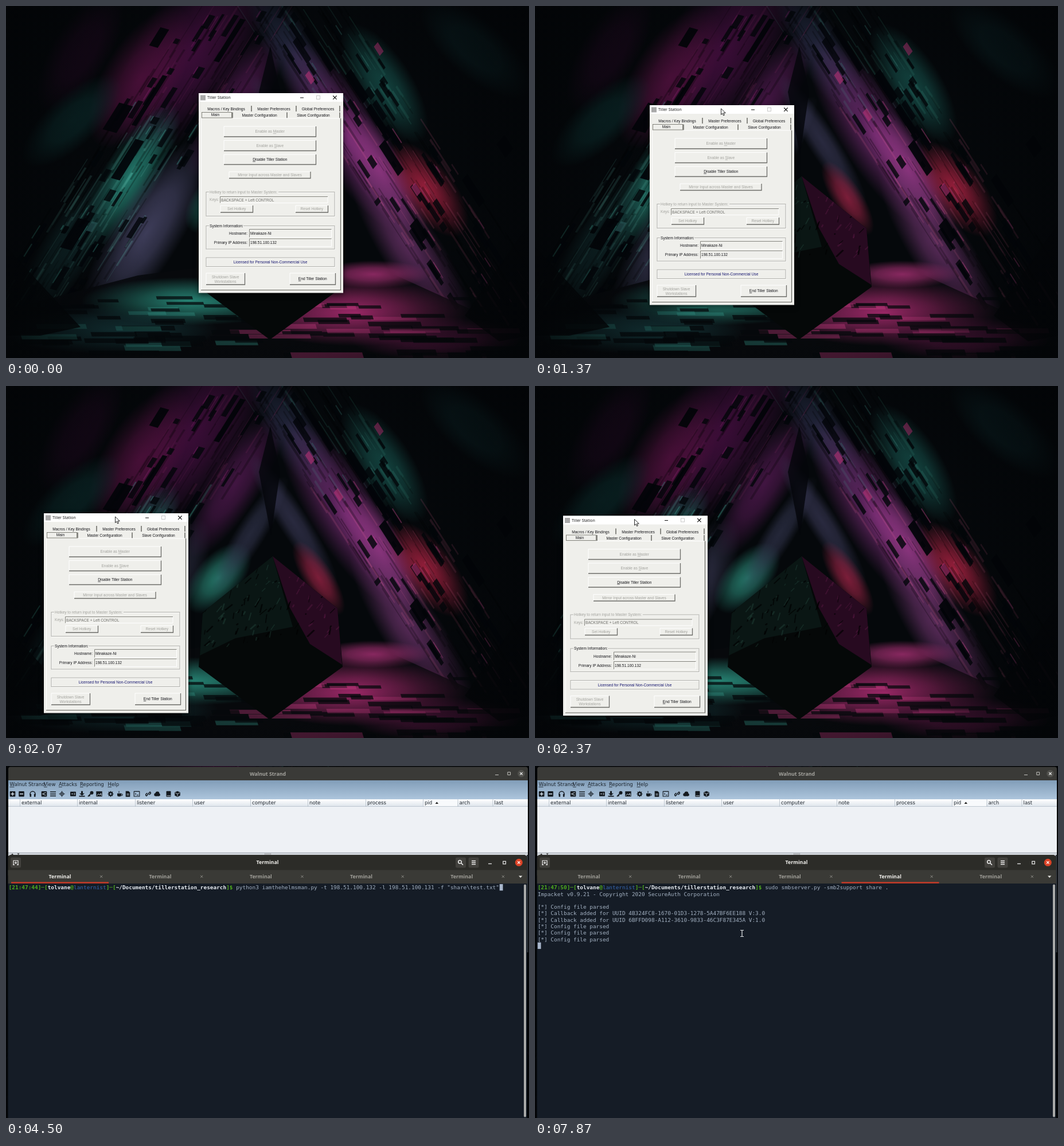
Recreate the animation shown at these times as an HTML page with a canvas. Size 912 by 614 pixels, loop 8000 ms.

```html
<!DOCTYPE html>
<html lang="en">
<head>
<meta charset="utf-8">
<title>Desktop and terminal</title>
<style>
html, body { margin: 0; width: 100%; height: 100%; overflow: hidden; background: #05070a; }
canvas, svg { position: absolute; left: 0; top: 0; width: 912px; height: 614px; display: block; }
text { white-space: pre; }
.ui { font: 6.6px "Liberation Sans", Arial, sans-serif; }
.cap { font: 7px "Open Sans", sans-serif; }
.menu { font: 8.6px "DejaVu Sans", sans-serif; fill: #1c242c; }
.head { font: 700 8.8px "Noto Sans", sans-serif; }
.mono { font: 9.41px "DejaVu Sans Mono", monospace; fill: #a3b1c2; }
.mono .g { fill: #4fae1d; font-weight: 700; }
.mono .w { fill: #e8edf2; font-weight: 700; }
.mono .b { fill: #3768b0; }
#win { filter: drop-shadow(0 3px 5px rgba(0,0,0,.6)); }
</style>
</head>
<body>
<canvas id="wall" width="912" height="614"></canvas>
<svg id="stage" viewBox="0 0 912 614" xmlns="http://www.w3.org/2000/svg">
  <defs>
    <linearGradient id="bar" x2="0" y2="1"><stop stop-color="#819db8"/><stop offset="1" stop-color="#adc5dc"/></linearGradient>
    <linearGradient id="cols" x2="0" y2="1"><stop stop-color="#fff"/><stop offset="1" stop-color="#dde4eb"/></linearGradient>
  </defs>
  <g id="desk"><g id="win"></g></g>
  <g id="term"></g>
  <g id="arrow"><path d="M0 0V10.5L2.4 8.3L4.1 12L5.9 11.2L4.2 7.6H7.8Z" stroke-width=".9"/></g>
  <path id="beam" d="M-3-5.5H-.8L0-5L.8-5.5H3M0-5V5M-3 5.5H-.8L0 5L.8 5.5H3" fill="none" stroke="#e6e9ec" stroke-width="1.2"/>
</svg>
<script>
const $ = id => document.getElementById(id);
const LOOP = 8000, CUT = 4500, SWITCH = 6670;
const APP = 'Tiller Station', CONSOLE = 'Walnut Strand';

// ---- wallpaper -------------------------------------------------
function paintWall() {
  const c = $('wall').getContext('2d');
  let seed = 41;
  const rnd = (a = 0, b = 1) => a + (b - a) * (seed = seed * 16807 % 2147483647) / 2147483647;
  const L = 2.13, R = 1.0;
  const poly = (fill, ...p) => {
    c.beginPath();
    for (let i = 0; i < p.length; i += 2) c.lineTo(p[i], p[i + 1]);
    c.closePath(); c.fillStyle = fill; c.fill();
  };
  const glow = (x, y, rx, ry, rot, col, a) => {
    c.save(); c.translate(x, y); c.rotate(rot); c.scale(rx, ry);
    const g = c.createRadialGradient(0, 0, 0, 0, 0, 1);
    g.addColorStop(0, col + a); g.addColorStop(.45, col + '88'); g.addColorStop(1, col + '00');
    c.fillStyle = g; c.fillRect(-1, -1, 2, 2); c.restore();
  };
  const slab = (x, y, len, wid, rot, col) => {
    c.save(); c.translate(x, y); c.rotate(rot);
    poly(col, -len / 2, -wid / 2, len / 2 - wid * .3, -wid / 2, len / 2, wid / 2, -len / 2 + wid * .3, wid / 2);
    c.restore();
  };
  const spot = side => {
    const s = rnd();
    return side < 0 ? [425 - s * 370 + rnd(-95, 95), s * 520] : [495 + s * 370 + rnd(-95, 95), s * 520];
  };

  c.fillStyle = '#05080b'; c.fillRect(0, 0, 912, 614);
  // left wall
  glow(330, 70, 220, 95, L, '#4d0f47', 'dd');
  glow(235, 125, 140, 65, L, '#68144d', 'bb');
  glow(130, 80, 120, 50, L, '#2c0a2a', '99');
  glow(400, 170, 150, 45, L, '#571a55', 'bb');
  glow(115, 200, 110, 45, 2.4, '#0f3d3c', '99');
  glow(215, 300, 150, 48, L, '#2a9483', 'cc');
  glow(245, 395, 190, 60, L, '#514f74', 'bb');
  glow(110, 420, 150, 48, L, '#173c3d', '99');
  // hollow between the walls
  glow(370, 335, 75, 40, 2.3, '#2c8f7d', 'cc');
  glow(425, 260, 120, 26, L, '#33364f', 'aa');
  glow(500, 235, 140, 26, R, '#3b3a58', 'aa');
  glow(545, 335, 75, 26, R, '#a52549', 'bb');
  // right wall
  glow(505, 85, 150, 45, R, '#2a304b', 'cc');
  glow(595, 225, 200, 62, R, '#752b74', 'dd');
  glow(650, 285, 140, 45, R, '#9a3a8a', 'cc');
  glow(660, 135, 120, 48, R, '#1a6059', 'bb');
  glow(735, 320, 100, 46, .9, '#c3264a', 'dd');
  glow(710, 430, 190, 52, R, '#733672', 'cc');
  glow(820, 75, 120, 50, .7, '#0f3033', '88');
  poly('#04050acc', 461, 70, 478, 150, 462, 260, 441, 150);

  // slanted fibres, then blocks
  c.filter = 'blur(.5px)';
  for (let i = 0; i < 420; i++) {
    const side = i % 2 ? 1 : -1, [x, y] = spot(side);
    const tint = i % 3 ? '#00000040' : side < 0 ? (y < 200 ? '#9a3a7022' : '#6cc8b82c') : (y < 190 ? '#50b0a022' : '#ff70a024');
    slab(x, y, rnd(20, 100), rnd(1, 4), side < 0 ? L : R, tint);
  }
  for (let i = 0; i < 120; i++) {
    const side = i % 2 ? 1 : -1, [x, y] = spot(side), len = rnd(12, 52), wid = rnd(4, 11), rot = side < 0 ? L : R;
    slab(x, y, len, wid, rot, '#03060ad0');
    if (i % 4 < 2) slab(x + side * 5, y - 4, len * .6, 2, rot, side < 0 ? (y > 170 ? '#3c9c8c66' : '#7c206666') : (y > 170 ? '#c2468c66' : '#33706c66'));
  }
  [[195, 195, 62, 24], [250, 165, 105, 8], [212, 268, 85, 15], [120, 398, 66, 20], [267, 55, 42, 15], [390, 60, 90, 9]]
    .forEach(b => slab(...b, L, '#030509ee'));
  [[612, 140, 62, 15], [650, 203, 70, 12], [672, 265, 66, 15], [720, 392, 42, 18], [815, 322, 60, 14], [870, 245, 34, 20], [545, 75, 90, 9]]
    .forEach(b => slab(...b, R, '#030509ee'));
  [[150, 385], [400, 505], [650, 75], [530, 125], [580, 190], [715, 320]]
    .forEach(([x, y]) => slab(x, y, 22, 10, x < 450 ? L : R, x < 450 ? '#33706f99' : '#b5327499'));
  c.filter = 'none';

  // floor
  poly('#070a0ddd', 0, 530, 230, 470, 460, 440, 680, 470, 912, 575, 912, 614, 0, 614);
  glow(320, 515, 190, 42, 0, '#2b9482', 'dd');
  glow(180, 565, 190, 42, 0, '#1b4a4d', 'bb');
  glow(610, 535, 200, 58, 0, '#b42d76', 'dd');
  glow(750, 580, 150, 38, 0, '#701b51', 'aa');
  glow(640, 468, 100, 24, 0, '#b5337d', 'bb');
  for (let i = 0; i < 85; i++) {
    const y = rnd(505, 612), x = rnd(60, 860), k = (y - 480) / 130;
    slab(x, y, rnd(35, 85) * (.6 + k), rnd(3, 5) + 6 * k, 0, i % 4 ? '#05080bc0' : x < 440 ? '#37a39455' : '#d8408a55');
  }
  poly('#040609d8', 0, 420, 130, 560, 60, 575, 0, 575);
  poly('#040609c0', 912, 380, 800, 540, 860, 585, 912, 575);

  // cube
  poly('#050808', 465, 297, 578, 388, 587, 490, 460, 582, 336, 490, 343, 395);
  poly('#0a1614', 465, 297, 343, 395, 338, 470, 400, 440, 500, 420);
  poly('#270a20', 465, 297, 578, 388, 586, 486, 530, 450, 494, 385);
  c.save();
  c.beginPath(); c.moveTo(465, 297); c.lineTo(578, 388); c.lineTo(586, 480); c.lineTo(500, 430); c.lineTo(340, 465); c.lineTo(343, 395); c.clip();
  for (let i = 0; i < 170; i++) {
    const x = rnd(340, 585);
    slab(x, rnd(300, 470), rnd(3, 18), rnd(1, 3), rnd(1.7, 2.5), i % 2 ? '#000a' : x < 480 ? '#2a564855' : '#6a205055');
  }
  c.restore();

  const v = c.createRadialGradient(456, 330, 240, 456, 330, 560);
  v.addColorStop(0, '#02040600'); v.addColorStop(1, '#020406e0');
  c.fillStyle = v; c.fillRect(0, 0, 912, 614);
}

// ---- svg helpers -----------------------------------------------
const rect = (x, y, w, h, fill, more = '') => `<rect x="${x}" y="${y}" width="${w}" height="${h}" fill="${fill}" ${more}/>`;
const line = (d, col, w = 1, more = '') => `<path d="${d}" fill="none" stroke="${col}" stroke-width="${w}" ${more}/>`;
const text = (x, y, s, cls, fill = '', anchor = 'start', more = '') =>
  `<text x="${x}" y="${y}" class="${cls}" text-anchor="${anchor}" ${fill && `fill="${fill}"`} ${more}>` +
  s.replace(/_(.)/, '<tspan text-decoration="underline">$1</tspan>') + '</text>';

// ---- settings window -------------------------------------------
function buildWindow() {
  const INK = '#16161a', DIM = '#a3a39e', EDGE = '#6c6c68';
  const label = (x, y, s, col = INK, anchor = 'middle') => text(x, y + 2.4, s, 'ui', col, anchor);
  const button = (x, y, w, h, s, col = DIM) =>
    line(`M${x} ${y + h}V${y}H${x + w}`, '#fff') + line(`M${x} ${y + h}H${x + w}V${y}`, EDGE, 1.3) +
    (s ? label(x + w / 2, y + h / 2, s, col) : '');
  const frame = (x, y, w, h) =>
    rect(x + 1, y + 1, w, h, 'none', 'stroke="#fff" stroke-width=".8"') + rect(x, y, w, h, 'none', 'stroke="#a9a9a4" stroke-width=".9"');
  const group = (y, h, s, w, col) => frame(13, y, 224, h) + rect(18, y - 4, w, 8, '#efefeb') + label(19, y, s, col, 'start');
  const field = (x, y, w, h, s, col) =>
    line(`M${x} ${y + h}H${x + w}V${y}`, '#fff') + line(`M${x} ${y + h}V${y}H${x + w}`, '#85857f') + label(x + 1.5, y + h / 2 + .2, s, col, 'start');
  const sep = (x, y) => line(`M${x} ${y}v10`, '#44443f', 1.2);

  $('win').innerHTML = rect(0, 0, 252, 348.5, '#efefeb') + rect(0, 0, 252, 15, '#fff') +
    rect(3, 3.5, 9, 9, '#a9a9a9') + text(15, 10, APP, 'cap', '#111') +
    line('M177 8H183', '#111') + rect(205.5, 4.5, 6, 6, 'none', 'stroke="#c4c4c4" stroke-width=".9"') +
    line('M234.2 4.5l6.4 6.4m0-6.4l-6.4 6.4', '#111', 1.1) +
    label(48, 27.8, 'Macros / Key Bindings') + label(131, 27.8, 'Master Preferences') + label(208, 27.8, 'Global Preferences') +
    sep(92, 22) + sep(170, 22) + sep(246, 22) +
    rect(5.5, 33.5, 52, 9.5, 'none', 'stroke="#77776f" stroke-width=".9"') + sep(59, 33.5) + sep(154, 33.5) + sep(246, 33.5) +
    label(29, 38, 'Main') + label(106, 39, 'Master Configuration') + label(200, 39, 'Slave Configuration') +
    line('M4.5 343V44M59 44H246', '#fff') + line('M4 343.5H247.5V44', '#66665f', 1.2) +
    button(44, 58, 160.5, 18, 'Enable as _Master') + button(44, 82.5, 160.5, 18, 'Enable as _Slave') +
    button(44, 107, 160.5, 17.5, '_Disable ' + APP, INK) + button(53, 137, 142, 11.5, 'Mirror Input across Master and Slaves') +
    group(172.5, 42, 'Hotkey to return input to Master System:', 121, DIM) +
    label(19, 186, 'Keys:', DIM, 'start') + field(37.5, 180.5, 187.5, 11, 'BACKSPACE + Left CONTROL', '#70706c') +
    button(38, 196, 56.5, 12, 'Set Hotkey') + button(169, 196, 56.5, 12, 'Reset Hotkey') +
    group(231.5, 40.5, 'System Information:', 60, INK) +
    label(85, 244.7, 'Hostname:', INK, 'end') + field(88.5, 237.5, 143, 14, 'Minakaze-Ni', INK) +
    label(85, 261, 'Primary IP Address:', INK, 'end') + field(88.5, 254, 143, 13.5, '198.51.100.132', INK) +
    frame(13, 287, 224, 15.5) + label(125, 295, 'Licensed for Personal Non-Commercial Use', '#14146e') +
    button(13, 314, 67.5, 20) + label(46.5, 320.5, 'Shutdown Slave', DIM) + label(46.5, 328.5, 'Workstations', DIM) +
    button(159, 314, 79.5, 20, '_End ' + APP, INK);
}

// ---- console and terminal --------------------------------------
function toolbar() {
  const K = '#141a20';
  const at = (x, s) => `<g transform="translate(${x} 48.7)" stroke-linejoin="round">${s}</g>`;
  const box = rect(-4.8, -4.8, 9.6, 9.6, K, 'rx="1.3"');
  const stroke = (d, w = 1.4) => line(d, K, w), cut = (d, w = 1.3) => line(d, '#cfdbe6', w);
  const dot = (x, y, r) => `<circle cx="${x}" cy="${y}" r="${r}" fill="${K}"/>`;
  const fill = d => `<path d="${d}" fill="${K}"/>`;
  return [
    [11.5, box + cut('M-3 0H3M0-3V3', 1.6)], [27, box + cut('M-3 0H3', 1.6)],
    [46.5, stroke('M-4.5 2V0A4.5 4.5 0 0 1 4.5 0V2') + rect(-5, 0, 2.6, 5, K) + rect(2.4, 0, 2.6, 5, K)],
    [66.5, box + cut('M-3 0L3-2.5M-3 0L3 2.5', 1)], [82, stroke('M-5-3.5H5M-5 0H5M-5 3.5H5', 1.6)],
    [97.5, stroke('M0-5V5M-5 0H5M3 0A3 3 0 1 1-3 0A3 3 0 1 1 3 0', 1)],
    [117, rect(-5, -4, 10, 8, K, 'rx="1"') + cut('M-3 0H0M1.5-1H3.5M1.5 1H3.5', 1)],
    [132.5, fill('M-1.5-5H1.5V-1H4.5L0 3L-4.5-1H-1.5Z') + stroke('M-5 4H5', 1.8)],
    [147.5, dot(2, -2, 3) + stroke('M0 0L-4.5 4.5M-2.5 2.5L-1 4', 1.9)],
    [162.5, rect(-5.2, -4.5, 10.4, 9, K) + cut('M-4 3L-1 0L1 2L3-1L4 3', 1)],
    [182.5, dot(0, 0, 3.7) + line('M0-5V5M-5 0H5M-3.6-3.6L3.6 3.6M-3.6 3.6L3.6-3.6', K, 1.6) + '<circle r="1.5" fill="#9fb7cd"/>'],
    [198, fill('M-4-1H3V2Q3 4.5 0 4.5H-1Q-4 4.5-4 2Z') + stroke('M3 0Q5.5 0 5 2Q4.5 3 3 3M-1-5V-2', 1.1)],
    [212.5, fill('M-3.8-5H1.2L3.8-2.4V5H-3.8Z') + cut('M-2 0H2M-2 2H2', .8)],
    [228, rect(-4.8, -4.3, 9.6, 8.6, 'none', `stroke="${K}" stroke-width="1.1"`) + stroke('M-3-1.5L-1 0L-3 1.5M0 2H3', 1)],
    [248, stroke('M-1 1.5L-3 3.5A2 2 0 0 1-4 .5L-1.5-1.5M1-1.5L3-3.5A2 2 0 0 1 4-.5L1.5 1.5M-1.5 1.5L1.5-1.5', 1.5)],
    [263.5, dot(-2.5, 1.2, 2.7) + dot(.5, -.8, 3.4) + dot(3, 1.5, 2.4) + rect(-2.5, 1, 5.5, 2.9, K)],
    [283.5, rect(-4, -5, 8, 10, K, 'rx="1"') + cut('M-3 3.2H3.5', .9)],
    [299, fill('M0-5L4.8-2.6V2.8L0 5.2L-4.8 2.8V-2.6Z') + cut('M-4-2L0 0L4-2M0 0V4.5', .8)]
  ].map(([x, s]) => at(x, s)).join('');
}

const TABS = [94, 269, 444.3, 619.5, 794.7];

function buildTerm() {
  const menus = [[6.5, CONSOLE], [66, 'View'], [92, 'Attacks'], [129, 'Reporting'], [177.5, 'Help']];
  const cols = [[24, 'external'], [124, 'internal'], [225, 'listener'], [325, 'user'], [426, 'computer'], [526, 'note'],
    [627, 'process'], [727, 'pid'], [787.5, 'arch'], [848.5, 'last']];
  const pad = (x, s) => rect(x, 159.5, 18, 18, '#42413d', 'rx="2.5"') + s;
  const upper = rect(4, 1.5, 906, 30, '#3a3a37', 'rx="4"') + text(456.5, 17, CONSOLE, 'head', '#a5a49f', 'middle') +
    line('M853 15.5H859M874.8 10.8H879.6V15.6H874.8Z', '#c4c4c0') +
    '<circle cx="898.5" cy="13.3" r="6.3" fill="#50504c"/>' + line('M896.3 11.1l4.4 4.4m0-4.4l-4.4 4.4', '#eee', 1.2) +
    rect(4, 25, 906, 33, 'url(#bar)') + menus.map(([x, s]) => text(x, 35.3, '_' + s, 'menu')).join('') + toolbar() +
    rect(4, 58, 906, 13, 'url(#cols)') + rect(727, 58, 60, 12.5, '#f8fafc') +
    cols.map(([x, s]) => line(`M${x + .5} 58V71`, '#b3bdc7', .8) + text(x + 3, 67.2, s, 'menu')).join('') +
    '<path d="M748.5 66L751.3 62.5L754 66Z" fill="#222"/>' + line('M4 70.7H910', '#aab6c1', .8) +
    rect(4, 71, 906, 80, '#eef1f5') + rect(4, 151, 906, 6, '#d2d7dd') + line('M4 151.3H910', '#8d969e', .7) +
    '<path d="M9 155L11 152.5L13 155ZM19.5 152.5H23.5L21.5 155Z" fill="#333"/>' + line('M451 153.5H462', '#888', 2, 'stroke-dasharray="1 1"');

  const header = rect(908, 155, 2.5, 170, '#30353b') + rect(3.5, 155, 905, 40, '#2c2c28', 'rx="5"') +
    text(456, 171.4, 'Terminal', 'head', '#f1f0ec', 'middle') +
    pad(8, line('M13 172V165H21V172M12 172.3H15M19 172.3H22M17 166.5V171M14.8 168.8H19.2', '#eee', 1.2)) +
    pad(784, line('M794.3 167.2A2.8 2.8 0 1 1 788.7 167.2A2.8 2.8 0 1 1 794.3 167.2M793.6 169.3L797 172.6', '#eee', 1.5)) +
    pad(806.5, line('M812 165.5H819M812 168.5H819M812 171.5H819', '#eee', 1.4)) +
    line('M841 170.5H847', '#ddd', 1.4) + rect(866.8, 166.3, 4.6, 4.6, 'none', 'stroke="#ddd" stroke-width="1.3"') +
    '<circle cx="894.3" cy="168.3" r="6.5" fill="#dc4327"/>' + line('M892.1 166.1l4.4 4.4m0-4.4l-4.4 4.4', '#fff', 1.2) +
    rect(3.5, 181.5, 905, 24, '#3a3a36') +
    TABS.map((x, i) => rect(x - 85, 182, 170, 22.5, '#454540', `id="hov${i}"`) +
      text(x, 196.2, 'Terminal', 'head', '', 'middle', `id="tab${i}"`) +
      line(`M${x + 70.2} 190.8l4 4m0-4l-4 4`, '#8e8d87')).join('') +
    rect(0, 202.3, 170, 2.4, '#cb3a27', 'id="mark"') + '<path d="M894 191.5H900.4L897.2 195Z" fill="#e4e4e0"/>';

  const row = (n, s) => `<text class="mono" x="4.7" y="${215.2 + n * 11.3}">${s}</text>`;
  const span = (k, s) => `<tspan class="${k}">${s}</tspan>`;
  const prompt = (clock, cmd) => row(0, span('g', `[${clock}]─[`) + span('w', 'tolvane') + span('g', '@') + span('b', 'lanternist') +
    span('g', ']─[') + span('w', '~/Documents/tillerstation_research') + span('g', ']$') + ' ' + cmd);
  const parsed = '[*] Config file parsed', added = '[*] Callback added for UUID ';
  const log = ['Impacket v0.9.21 - Copyright 2020 SecureAuth Corporation', '', parsed,
    added + '4B324FC8-1670-01D3-1278-5A47BF6EE188 V:3.0', added + '6BFFD098-A112-3610-9833-46C3F87E345A V:1.0', parsed, parsed, parsed];

  $('term').innerHTML = upper + header + rect(3.5, 205, 905, 409, '#151c26') +
    rect(903, 206.5, 4, 406, '#a9aaa9', 'rx="2"') +
    `<g id="pane0">${prompt('21:47:44', 'python3 iamthehelmsman.py -t 198.51.100.132 -l 198.51.100.131 -f "share\\test.txt"')}</g>` +
    `<g id="pane3">${prompt('21:47:50', 'sudo smbserver.py -smb2support share .')}${log.map((s, i) => row(i + 1, s)).join('')}</g>` +
    rect(0, 0, 5.8, 11.3, '#a9b7cc', 'id="block"');
}

// ---- motion: [ms, x, y, ...] -----------------------------------
const DRAG = [[0, 336, 152], [1170, 326, 153], [1200, 307, 156], [1230, 282, 160], [1270, 254, 164], [1300, 226, 168], [1330, 200, 173],
  [1400, 182, 177], [1870, 159, 185], [1930, 139, 191], [1970, 112, 201], [2030, 84, 214], [2070, 66, 222], [2100, 61, 224],
  [2130, 59, 225], [2300, 54, 225.5], [2370, 49, 226.5]];
const REACH = [[630, 523, 181], [670, 508, 176], [730, 486, 167], [770, 468, 160], [830, 460.5, 158]];
// last column: 1 arrow, 2 text beam
const ROAM = [[CUT, 0, 0, 0], [5230, 470, 268, 2], [5300, 488, 248, 2], [5370, 512, 218, 2], [5430, 532, 198, 1], [5500, 575, 178, 1],
  [5570, 625, 168, 1], [5630, 670, 170, 1], [5700, 712, 177, 1], [5770, 738, 184, 1], [5830, 750, 188, 1], [5900, 756, 190, 1], [5970, 758, 190, 1],
  [6070, 745, 190, 1], [6130, 716, 190, 1], [6200, 682, 189, 1], [6270, 650, 188, 1], [6330, 630, 187, 1], [6430, 619, 187, 1],
  [7130, 618, 184, 1], [7170, 590, 232, 2], [7200, 562, 278, 2], [7370, 547, 293, 2], [7800, 452, 292, 2], [7870, 361, 292, 2]];
const now = (rows, t) => rows.reduce((last, r) => r[0] <= t ? r : last);
const show = (el, on) => el.style.display = on ? '' : 'none';
const move = (el, x, y) => el.setAttribute('transform', `translate(${x} ${y})`);

function draw(t) {
  const desk = t < CUT, arrow = $('arrow'), beam = $('beam');
  show($('desk'), desk); show($('term'), !desk);
  arrow.setAttribute('fill', desk ? '#fff' : '#161616');
  arrow.setAttribute('stroke', desk ? '#111' : '#eee');
  if (desk) {
    const [, x, y] = now(DRAG, t), [, cx, cy] = now(REACH, t);
    move($('win'), x, y);
    t < 1170 ? move(arrow, cx, cy) : move(arrow, x + 124.5, y + 6);
    show(arrow, t >= 630 && t < 2730); show(beam, false);
    return;
  }
  const [, mx, my, kind] = now(ROAM, t), tab = t < SWITCH ? 0 : 3;
  move(arrow, mx, my); move(beam, mx, my);
  show(arrow, kind === 1); show(beam, kind === 2);
  TABS.forEach((x, i) => {
    $('tab' + i).setAttribute('fill', i === tab ? '#f1f0ec' : '#a09f99');
    show($('hov' + i), i !== tab && kind === 1 && my > 181 && my < 205 && Math.abs(mx - x) < 85);
  });
  move($('mark'), TABS[tab] - 85, 0);
  show($('pane0'), tab === 0); show($('pane3'), tab === 3);
  const off = tab ? t >= 7270 && t < 7870 : t >= 5230 && t < 5830 || t >= 6430;
  show($('block'), !off);
  tab ? move($('block'), 4.6, 307.8) : move($('block'), 860.7, 206);
}

paintWall();
buildWindow();
buildTerm();
const start = performance.now();
(function tick() {
  draw((performance.now() - start) % LOOP);
  requestAnimationFrame(tick);
})();
</script>
</body>
</html>
```
